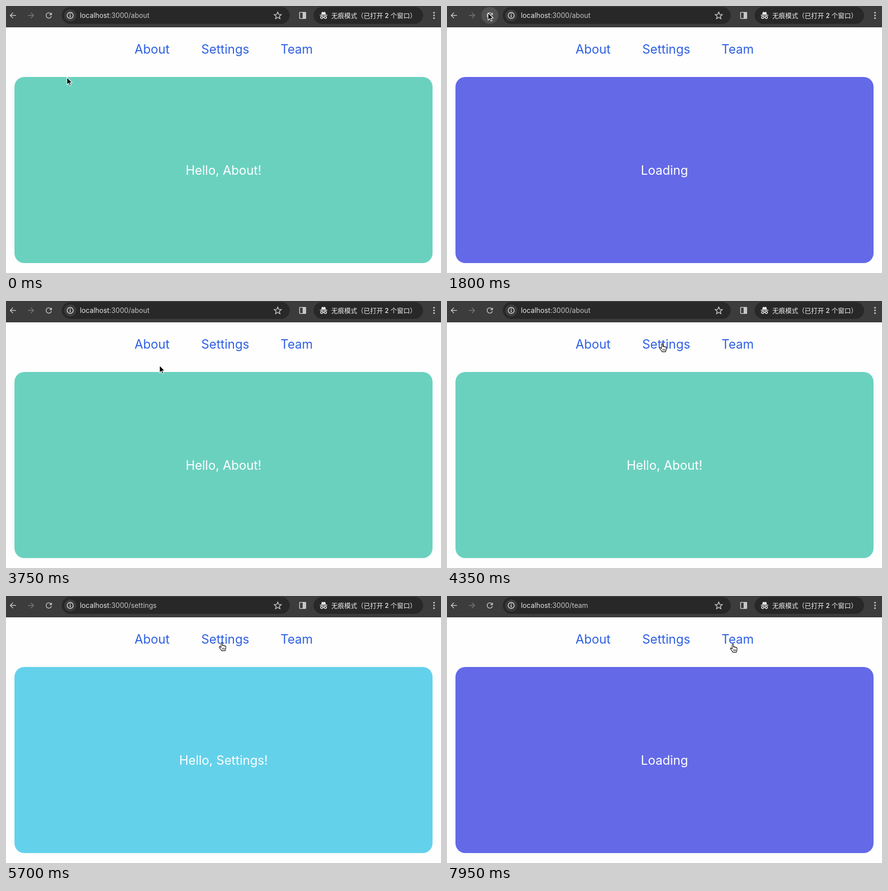
These frames come from a looping animation (874x538 px, 8 s). An HTML page:

```html
<!DOCTYPE html>
<html lang="zh">
<head>
<meta charset="utf-8">
<title>Streaming navigation</title>
<style>
  html, body { margin: 0; width: 100%; height: 100%; overflow: hidden; background: #fefefe; }
  svg { display: block; width: 874px; height: 538px; }
  text { font-family: Inter, "Noto Sans CJK SC", "Noto Sans CJK", sans-serif; font-optical-sizing: none; white-space: pre; }
  .page { font-size: 25px; text-anchor: middle; }
  .link { fill: #2f60e2; }
  .line { fill: none; stroke: #c7c7c7; stroke-width: 1.6; }
</style>
</head>
<body>
<svg viewBox="0 0 874 538">
  <rect width="874" height="538" fill="#fefefe"/>
  <rect width="874" height="43" fill="#3c3c3c"/>

  <g class="line">
    <path d="M20 19H9M14 13.5L8.5 19L14 24.5"/>
    <path d="M44 19H55M50 13.5L55.500 19L50 24.500" stroke="#777" style="stroke:#777"/>
  </g>
  <circle id="halo" cx="86" cy="19" r="17" fill="#525252"/>
  <path id="reload" transform="translate(76.8 9.8) scale(.77)" fill="#c7c7c7"
    d="M17.65 6.35A7.96 7.96 0 0 0 12 4a8 8 0 1 0 7.73 10h-2.08A6 6 0 1 1 12 6c1.66 0 3.14.69 4.22 1.78L13 11h7V4z"/>
  <path id="stop" class="line" d="M81 14L91 24M91 14L81 24"/>

  <rect x="112" y="2" width="458" height="34" rx="17" fill="#282828"/>
  <circle cx="129" cy="19" r="12" fill="#3c3c3c"/>
  <g class="line">
    <circle cx="129" cy="19" r="6" style="stroke:#e3e3e3;stroke-width:1.4"/>
    <path d="M129 15.300V17M129 18.200V22.500" style="stroke:#e3e3e3"/>
    <path d="M546 12.200l2 4.700 5.100.4-3.900 3.300 1.200 5-4.400-2.700-4.400 2.700 1.200-5-3.900-3.300 5.100-.4z" style="stroke-width:1.500"/>
    <rect x="589.800" y="12.800" width="12.400" height="12.400" rx="1"/>
  </g>
  <rect x="596" y="12.500" width="6.500" height="13" fill="#c7c7c7"/>
  <text x="148.500" y="24" font-size="13.800" fill="#e8e8e8">localhost<tspan id="path" fill="#c4c4c4"></tspan></text>

  <rect x="618" y="2" width="220" height="34" rx="17" fill="#282828"/>
  <path d="M633.200 17l1.300-4.600q.3-.8 1.200-.5l2.300.7 2.300-.7q.9-.3 1.200.5l1.300 4.600z" fill="#eee"/>
  <g class="line" style="stroke:#eee;stroke-width:1.500">
    <path d="M630.500 18.500H645.500M636.700 22.700q1.300-.8 2.600 0"/>
    <circle cx="634.400" cy="23" r="2.300"/>
    <circle cx="641.600" cy="23" r="2.300"/>
  </g>
  <text x="653.500" y="24" font-size="13" font-weight="500" fill="#eee">无痕模式（已打开 2 个窗口）</text>
  <g fill="#c7c7c7">
    <circle cx="860" cy="13.500" r="1.700"/>
    <circle cx="860" cy="19" r="1.700"/>
    <circle cx="860" cy="24.500" r="1.700"/>
  </g>

  <text class="page link" x="293.500" y="96">About</text>
  <text class="page link" x="440.500" y="96">Settings</text>
  <text class="page link" x="584" y="96">Team</text>
  <rect id="card" x="17" y="143" width="840" height="375" rx="20"/>
  <text id="message" class="page" x="437" y="340" fill="#fff"></text>

  <g id="cursor">
    <path id="arrow" fill="#000" stroke="#fff" stroke-width="1.100" stroke-linejoin="round"
      d="M.5.8V15.600L4 12.400L6.200 17.400L8.600 16.400L6.400 11.500H11z"/>
    <g id="hand" transform="translate(-6 -1)" stroke="#000" stroke-width="1.100" stroke-linejoin="round">
      <path fill="#fff" d="M5 11V2.600c0-2 2.600-2 2.600 0V7c.3-1.300 2.400-1.200 2.500.4c.5-1 2.300-.8 2.400.7c.6-.8 2.200-.5 2.200 1v3.300c0 1.800-1.400 2.400-1.500 5H6.200c-.3-2-3.200-4.200-4.600-6.600c-.9-1.700.8-2.600 2-1.400z"/>
      <path fill="none" stroke-width=".9" d="M7.800 11.500V15M9.900 11.500V15M12 11.500V15"/>
    </g>
  </g>
</svg>
<script>
const LOOP = 8000, TICK = 150;
const el = id => document.getElementById(id);
const clamp = v => Math.min(1, Math.max(0, v));
const smooth = u => u * u * (3 - 2 * u);

// Pointer hotspot: time, x, y
const route = [
  [0, 122, 143], [150, 122, 143], [1650, 82, 13], [2100, 82, 13],
  [3300, 292, 135], [3450, 292, 135], [3600, 294, 134], [4350, 432, 86],
  [5550, 432, 86], [5700, 433, 94], [6450, 575, 96], [6900, 575, 96],
  [7050, 574, 96], [7800, 574, 96], [7950, 574, 97], [LOOP, 574, 97]
];
const colors = { Loading: '#6469e8', About: '#6bd1bf', Settings: '#64d1eb' };
// Page state: time, address, card content
const pages = [
  [0, 'about', 'About'], [1800, 'about', 'Loading'], [3750, 'about', 'About'],
  [4650, 'settings', 'Loading'], [5700, 'settings', 'Settings'], [6600, 'team', 'Loading']
];
const links = [[258, 329], [391, 489], [552, 616]];

function pointerAt(t) {
  const i = route.findIndex(p => p[0] > t);
  const [t0, x0, y0] = route[i - 1], [t1, x1, y1] = route[i];
  const u = smooth((t - t0) / (t1 - t0));
  return [x0 + (x1 - x0) * u, y0 + (y1 - y0) * u].map(Math.round);
}

const show = (id, on) => el(id).setAttribute('visibility', on ? 'visible' : 'hidden');

function draw(now) {
  const t = Math.floor((now % LOOP) / TICK) * TICK;
  const [, address, content] = pages.findLast(p => p[0] <= t);
  el('path').textContent = ':3000/' + address;
  el('message').textContent = content === 'Loading' ? content : `Hello, ${content}!`;
  el('card').setAttribute('fill', colors[content]);

  const stopping = t >= 2250 && t < 3750;
  show('reload', !stopping);
  show('stop', stopping);
  el('halo').setAttribute('opacity', clamp((t - 1200) / 300) * (1 - clamp((t - 2250) / 450)));

  const [x, y] = pointerAt(t);
  const overLink = y > 70 && y < 104 && links.some(([a, b]) => x >= a && x <= b);
  el('cursor').setAttribute('transform', `translate(${x} ${y})`);
  show('hand', overLink);
  show('arrow', !overLink);
}

const start = performance.now();
function loop() {
  draw(performance.now() - start);
  requestAnimationFrame(loop);
}
loop();
</script>
</body>
</html>
```
